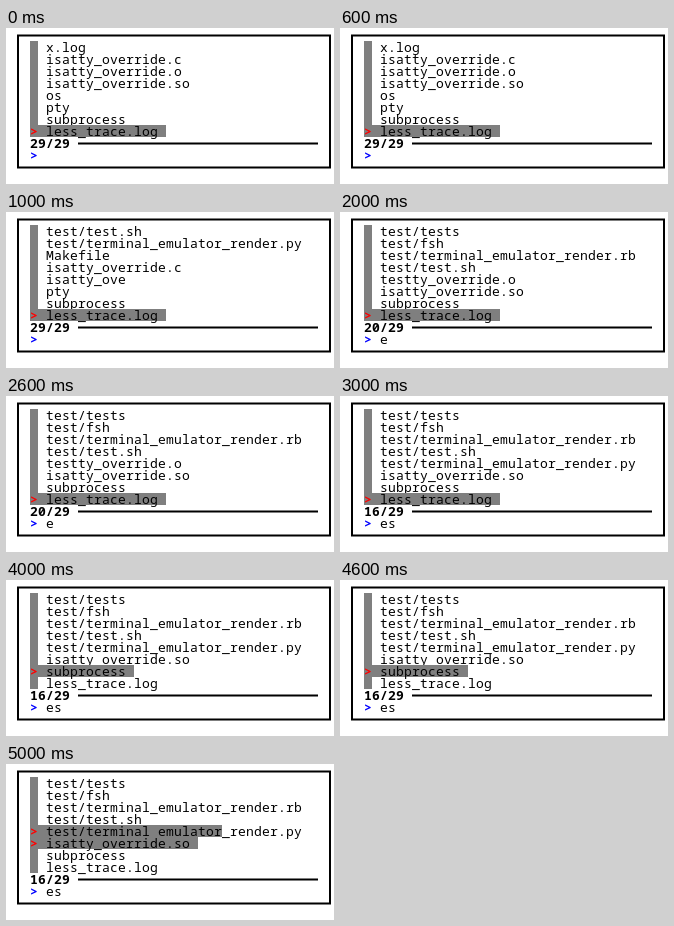
These frames come from a looping animation (328 by 156 pixels, 6000 ms). An HTML page:

```html
<!DOCTYPE html>
<html lang="en">
<head>
<meta charset="utf-8">
<title>Fuzzy finder</title>
<style>
  html, body { margin: 0; width: 100%; height: 100%; overflow: hidden; background: #fff; }
  svg { display: block; }
  text {
    font: 13px "Noto Sans Mono", monospace;
    letter-spacing: calc(8px - 1ch);
    white-space: pre;
  }
  .bold { font-weight: bold; }
  path { fill: none; stroke: #000; stroke-width: 2; }
</style>
</head>
<body>
<svg id="screen" width="328" height="156" viewBox="0 0 328 156"></svg>
<script>
const CELL_W = 8, CELL_H = 12, TOP = 1, BASELINE = 11;
const STEP_MS = 1000, LIST_ROWS = 8;
const GREY = '#7f7f7f', RED = '#f00', BLUE = '#00f';
const screen = document.getElementById('screen');

const RB = 'test/terminal_emulator_render.rb';
const PY = 'test/terminal_emulator_render.py';
const matches = ['test/tests', 'test/fsh', RB, 'test/test.sh', PY,
  'isatty_override.so', 'subprocess', 'less_trace.log'];

// marked: row -> number of highlighted cells after the pointer gutter
const steps = [
  { list: ['x.log', 'isatty_override.c', 'isatty_override.o', 'isatty_override.so',
      'os', 'pty', 'subprocess', 'less_trace.log'],
    marked: { 7: 16 }, count: '29/29', query: '' },
  { list: ['test/test.sh', PY, 'Makefile', 'isatty_override.c',
      'isatty_ove', 'pty', 'subprocess', 'less_trace.log'],
    marked: { 7: 16 }, count: '29/29', query: '' },
  { list: ['test/tests', 'test/fsh', RB, 'test/test.sh', 'testty_override.o',
      'isatty_override.so', 'subprocess', 'less_trace.log'],
    marked: { 7: 16 }, count: '20/29', query: 'e' },
  { list: matches, marked: { 7: 16 }, count: '16/29', query: 'es' },
  { list: matches, marked: { 6: 12 }, count: '16/29', query: 'es' },
  { list: matches, marked: { 4: 23, 5: 20 }, count: '16/29', query: 'es' },
];

function add(parent, tag, attrs, content = '') {
  const node = document.createElementNS('http://www.w3.org/2000/svg', tag);
  for (const name in attrs) node.setAttribute(name, attrs[name]);
  node.textContent = content;
  return parent.appendChild(node);
}

function print(parent, col, row, content, fill = '#000', weight = '') {
  add(parent, 'text', {
    x: col * CELL_W, y: TOP + row * CELL_H + BASELINE, fill, class: weight,
  }, content);
}

function drawFrame() {
  add(screen, 'path', { d: 'M12 7.5H324V139.5H12Z' });
  add(screen, 'path', { d: 'M72 115.5H312' });
  print(screen, 3, 10, '>', BLUE, 'bold');
}

// Rows paint downwards, so a highlight covers descenders from the row above.
function drawStep(group, { list, marked, count, query }) {
  group.replaceChildren();
  for (let i = 0; i < LIST_ROWS; i++) {
    const row = i + 1;
    add(group, 'rect', {
      x: 3 * CELL_W, y: TOP + row * CELL_H,
      width: CELL_W * (marked[i] ? marked[i] + 1 : 1), height: CELL_H, fill: GREY,
    });
    if (marked[i]) print(group, 3, row, '>', RED, 'bold');
    print(group, 5, row, list[i]);
  }
  print(group, 3, 9, count, '#000', 'bold');
  print(group, 5, 10, query);
}

drawFrame();
const content = add(screen, 'g', {});
let shown = -1;

function tick() {
  const index = Math.floor(performance.now() / STEP_MS) % steps.length;
  if (index !== shown) drawStep(content, steps[shown = index]);
  requestAnimationFrame(tick);
}
tick();
</script>
</body>
</html>
```
